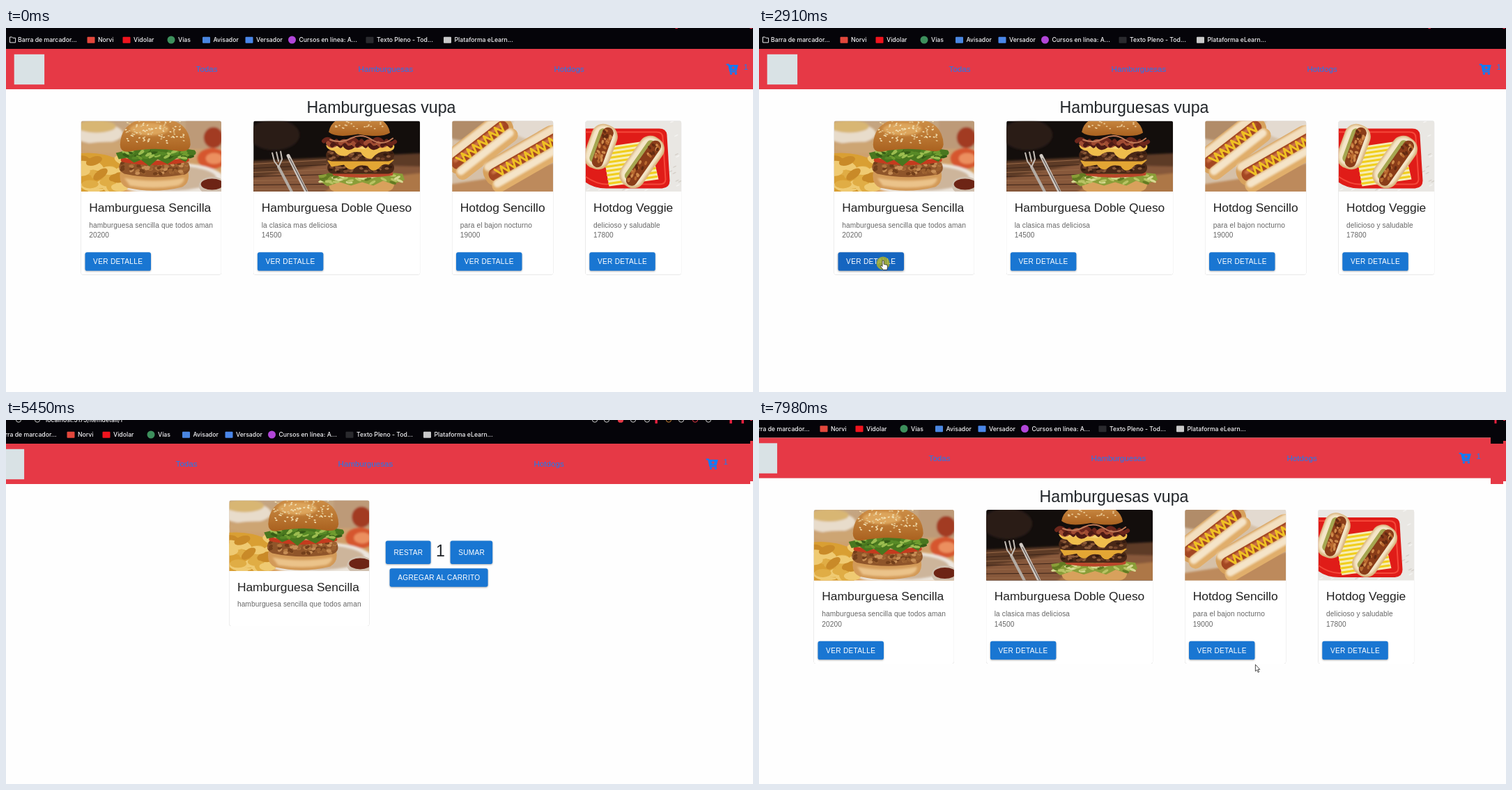
These frames come from a looping animation (1072x523 px, 8 s). An HTML page:

```html
<!DOCTYPE html>
<html lang="es">
<head>
<meta charset="utf-8">
<title>Tienda de hamburguesas</title>
<style>
  html, body { margin: 0; width: 100%; height: 100%; overflow: hidden; background: #fefefe; }
  svg { display: block; width: 100%; height: 100%; }
  text { font-family: "Liberation Sans", Arial, sans-serif; white-space: pre; }
  .tab { font: 500 8.7px Inter, sans-serif; fill: #f4f4f6; }
  .nav { font-size: 11.6px; fill: #1a7cf5; }
  .heading { font-size: 23.2px; fill: #212529; }
  .name { font-size: 17.4px; fill: #212121; }
  .info { font-size: 10.15px; letter-spacing: .01071em; fill: #666; }
  .label { font-size: 10.15px; letter-spacing: .02857em; fill: #fff; }
  .card { fill: #fff; filter: drop-shadow(0 .8px .6px rgba(0,0,0,.34)); }
  .button { fill: #1976d2; filter: drop-shadow(0 1px .8px rgba(0,0,0,.3)); }
  .hover .button { fill: #1565c0; filter: drop-shadow(0 1.8px 1.8px rgba(0,0,0,.4)); }
</style>
</head>
<body>
<svg id="stage" viewBox="0 0 1072 523" preserveAspectRatio="none"></svg>
<script>
const LOOP = 8000;
const BAR = '#050409', RED = '#e63946', BLUE = '#0d7dfb';

// ---- drawing helpers ----
const rect = (x, y, w, h, fill, extra = '') =>
  `<rect x="${x}" y="${y}" width="${w}" height="${h}" fill="${fill}" ${extra}/>`;
const blob = (x, y, rx, ry, fill, turn = 0) =>
  `<ellipse cx="${x}" cy="${y}" rx="${rx}" ry="${ry}" fill="${fill}" transform="rotate(${turn} ${x} ${y})"/>`;
const shape = (d, fill) => `<path d="${d}" fill="${fill}"/>`;
const line = (d, stroke, width) =>
  `<path d="${d}" fill="none" stroke="${stroke}" stroke-width="${width}" stroke-linecap="round" stroke-linejoin="round"/>`;
const text = (cls, x, y, str) => `<text class="${cls}" x="${x}" y="${y}">${str}</text>`;
const group = (x, y, body, attrs = '') => `<g transform="translate(${x} ${y})" ${attrs}>${body}</g>`;
const turned = (x, y, angle, body) => `<g transform="translate(${x} ${y}) rotate(${angle})">${body}</g>`;
const soft = body => `<g filter="url(#soft)">${body}</g>`;
const repeat = (n, make) => Array.from({ length: n }, (_, i) => make(i)).join('');

function seeded(seed) {
  const next = (min, max) => {
    seed = (seed * 16807) % 2147483647;
    return +(min + (max - min) * seed / 2147483647).toFixed(1);
  };
  next.pick = list => list[Math.floor(next(0, list.length - .06))];
  return next;
}

// ---- food pictures, drawn from their own top left corner ----
function burger() {
  const rnd = seeded(71);
  const crumbs = (n, x0, x1, y0, y1, rx, ry, colors) => repeat(n, () =>
    blob(rnd(x0, x1), rnd(y0, y1), rx, ry, rnd.pick(colors), rnd(-40, 40)));
  return rect(0, 0, 201, 102, 'url(#table)')
    + soft(rect(150, -10, 60, 50, '#bd9a78') + blob(24, 18, 36, 15, '#e8dccb') + blob(22, 8, 28, 9, '#d8b673')
      + blob(40, 38, 40, 8, '#cda573') + blob(190, 24, 14, 15, '#a23a24')
      + blob(188, 54, 21, 15, '#d6562f') + blob(191, 54, 12, 8, '#eb8f5f')
      + blob(128, 84, 78, 24, '#ece6de') + blob(128, 82, 66, 18, '#cdb59b'))
    + blob(10, 80, 62, 34, '#d99f33')
    + crumbs(36, -4, 62, 52, 104, 12, 6, ['#e0ad45', '#efca72', '#c98a28'])
    + shape('M57 70H153Q158 88 145 95Q105 105 66 96Q52 90 57 70Z', '#d39a58')
    + soft(shape('M62 82Q104 90 148 82Q148 90 138 93Q104 99 70 93Z', '#ebc38a'))
    + shape('M57 60Q104 54 154 60Q160 72 149 77Q104 85 62 76Q50 70 57 60Z', '#8f552a')
    + crumbs(70, 58, 152, 60, 77, 3.5, 2.2, ['#b37740', '#733f1b', '#9c6130', '#c68d55'])
    + line('M60 56Q104 65 152 56', '#c43b1e', 6)
    + shape('M50 46Q104 32 163 42Q169 49 156 51L150 59L138 53L124 62L110 55L98 65L86 56L76 60L66 53L54 55Z', '#49771f')
    + crumbs(45, 55, 158, 42, 54, 5, 2, ['#6f9c2f', '#365d16', '#9cbd50', '#588a27'])
    + shape('M56 34Q58 -4 105 -4Q156 -4 157 34Q156 46 138 43Q104 37 70 44Q56 46 56 34Z', 'url(#bun)')
    + soft(blob(98, 12, 28, 9, '#dda55c'))
    + crumbs(90, 64, 148, 0, 32, 1.6, .9, ['#f2dfb2', '#e2c087'])
    + blob(188, 93, 19, 13, '#cfbfae') + blob(188, 91, 16, 8, '#6d2415');
}

function doubleBurger() {
  const rnd = seeded(29);
  const patty = (x, y, w, h) => rect(x, y, w, h, '#4a2817', `rx="${h / 2}"`)
    + repeat(45, () => blob(rnd(x + 4, x + w - 4), rnd(y + 3, y + h - 3), 3, 1.8, rnd.pick(['#74442a', '#331a0f', '#8b5a39'])));
  return rect(0, 0, 239, 102, '#130e0c')
    + soft(blob(30, 20, 36, 22, '#2c1e17') + shape('M-9 58L250 46V112H-9Z', '#5d3b27')
      + shape('M-9 84L105 62L250 66V112H-9Z', '#87583a') + shape('M120 88L250 74V112H90Z', '#ad7747'))
    + repeat(9, i => line(`M0 ${62 + i * 6}L104 ${56 + i * 7}`, i % 2 ? '#3b2318' : '#976847', 1))
    + line('M36 66L56 104', '#b3aba3', 4) + line('M27 46L30 58L36 66L41 55L39 44M33 45L36 58', '#c4bdb6', 2)
    + line('M50 50L76 102', '#d0c9c3', 5) + line('M52 54L77 102', '#6d6460', 1.5)
    + shape('M108 86H202Q204 100 190 102H118Q106 100 108 86Z', '#d8a15c')
    + shape('M93 78Q150 68 214 76L217 85L200 91L186 86L172 93L156 88L140 93L124 88L106 94L96 87Z', '#8a9e38')
    + repeat(35, () => blob(rnd(98, 212), rnd(77, 89), 5, 1.8, rnd.pick(['#b9c364', '#637a22', '#d6d890']), rnd(-30, 30)))
    + line('M116 76Q155 82 198 76', '#b9472a', 5)
    + patty(106, 59, 96, 17)
    + shape('M106 57Q150 50 202 56L194 63Q186 60 180 68Q170 76 164 65Q152 61 144 69Q136 72 130 63L112 66Z', '#e3a634')
    + patty(104, 41, 98, 17)
    + shape('M104 35Q150 28 202 35Q204 43 192 44Q180 42 170 54Q160 56 154 45Q142 43 134 50Q122 52 116 43Q106 42 104 35Z', '#efbd4c')
    + soft(line('M114 37Q140 33 160 40', '#f8da82', 3))
    + repeat(16, i => line(`M${101 + i * 6} ${29 + i % 3 * 3}q5 ${i % 2 ? 7 : -6} 12 1`, ['#6b261b', '#a04c33', '#4d1a14'][i % 3], 6))
    + line('M110 27Q125 33 140 25T170 27T200 25', '#c17a58', 2)
    + shape('M108 16Q112 -8 152 -8Q192 -8 196 17Q184 25 150 19Q118 25 108 16Z', 'url(#bun)')
    + repeat(24, () => blob(rnd(116, 186), rnd(0, 13), 1.4, .9, '#e9c894'));
}

function hotdog() {
  const wave = (from, to) => 'M' + Array.from({ length: Math.floor((to - from) / 5) }, (_, i) =>
    `${from + i * 5 + (i % 2 ? 2 : 0)} ${i % 2 ? 6 : -7}`).join('L');
  const dog = (x, y, angle, len) => turned(x, y, angle,
    rect(-len - 6, -23, 2 * len + 12, 42, '#d7a15c', 'rx="19"')
    + soft(rect(-len, -21, 2 * len, 12, '#f3dfbf', 'rx="6"'))
    + rect(-len, -10, 2 * len, 19, '#a34622', 'rx="9"')
    + soft(rect(-len + 6, -7, 2 * len - 12, 5, '#d07848', 'rx="2"'))
    + line(wave(-len + 12, len), '#efc023', 3)
    + rect(-len - 4, 6, 2 * len + 8, 20, '#e0ae6b', 'rx="10"')
    + soft(rect(-len, 7, 2 * len, 11, '#f5e4c8', 'rx="5"')));
  return rect(0, 0, 145, 102, '#d5c0a8')
    + soft(blob(20, 8, 42, 20, '#b18c69') + blob(125, 8, 40, 20, '#e3dad0')
      + shape('M-9 92L70 80L155 58V112H-9Z', '#bd8a5c'))
    + dog(40, 35, -38, 50) + dog(106, 52, -30, 60);
}

function veggieDog() {
  const rnd = seeded(13);
  const dog = (x, y, len, angle) => turned(x, y, angle,
    rect(-19, -len, 38, 2 * len, '#d9b27a', 'rx="17"')
    + soft(rect(-17, -len + 2, 33, 2 * len - 5, '#f4e6c8', 'rx="15"'))
    + rect(-10, -len + 7, 13, 2 * len - 15, '#a5a650', 'rx="6"')
    + rect(-5, -len + 3, 16, 2 * len - 6, '#8a3d19', 'rx="8"')
    + repeat(30, () => blob(rnd(-3, 9), rnd(8 - len, len - 8), 3, 1.8, rnd.pick(['#b8682e', '#632a11', '#cf8a4b']), rnd(0, 90))));
  return rect(0, 0, 138, 102, '#e9e7e3')
    + repeat(60, () => blob(rnd(0, 138), rnd(0, 100), 3, .8, rnd.pick(['#d6d1ca', '#f5f4f2']), -25))
    + shape('M0 11H106Q116 11 117 20L121 86Q121 96 110 97H30Q12 97 0 88Z', '#e01c18')
    + line('M0 16H102Q111 16 111 24L115 84Q115 91 106 91H30Q16 91 0 80', '#f5483a', 2)
    + shape('M24 38L92 28L105 84L34 94Z', '#f7edb4')
    + repeat(9, i => line(`M${26 + i} ${42 + i * 6}L${94 + i} ${32 + i * 6}`, '#f1ce1d', 3))
    + dog(22, 37, 33, 20) + dog(81, 59, 41, 35);
}

// ---- page parts ----
let clipCount = 0;
function picture(width, body) {
  const id = 'photo' + clipCount++;
  return `<clipPath id="${id}"><path d="M0 101.5V3Q0 0 3 0H${width - 3}Q${width} 0 ${width} 3V101.5Z"/></clipPath>`
    + `<g clip-path="url(#${id})">${body}</g>`;
}

function button(x, y, w, h, label, id = '') {
  return group(x, y, `<rect class="button" width="${w}" height="${h}" rx="2.9"/>`
    + text('label', 11.6, h / 2 + 3.6, label), id && `id="${id}"`);
}

function card(x, y, w, h, photo, name, lines, extra = '') {
  return group(x, y, `<rect class="card" width="${w}" height="${h}" rx="2.9"/>`
    + picture(w, photo()) + text('name', 11.6, 130.3, name)
    + lines.map((str, i) => text('info', 11.6, 153 + i * 14.5, str)).join('') + extra);
}

const menu = [
  [107.7, 201.2, burger, 'Hamburguesa Sencilla', 'hamburguesa sencilla que todos aman', '20200'],
  [355.1, 239, doubleBurger, 'Hamburguesa Doble Queso', 'la clasica mas deliciosa', '14500'],
  [640.2, 145, hotdog, 'Hotdog Sencillo', 'para el bajon nocturno', '19000'],
  [831.5, 137.6, veggieDog, 'Hotdog Veggie', 'delicioso y saludable', '17800'],
];

const listPage = text('heading', 431.5, 122, 'Hamburguesas vupa')
  + menu.map(([x, w, photo, name, info, price], i) => card(x, 133.5, w, 221, photo, name, [info, price],
      button(5.8, 188.8, 94.5, 26.5, 'VER DETALLE', 'buy' + i))).join('');

const detailPage = card(349.3, 111.4, 201, 180.5, burger, menu[0][3], [menu[0][4]])
  + button(573.8, 169.4, 64.8, 33.6, 'RESTAR') + text('heading', 646, 191.5, '1')
  + button(666.6, 169.4, 60.6, 33.6, 'SUMAR') + button(579.6, 209.2, 141, 26.5, 'AGREGAR AL CARRITO');

const bookmarks = [
  [132, 'Norvi', '#e2473c'], [183, 'Vidolar', '#f0141e'], [247, 'Vías', '#3d8f5c', 'round'],
  [297.5, 'Avisador', '#4a86e0'], [359, 'Versador', '#4a86e8'],
  [420.5, 'Cursos en línea: A...', '#b146d8', 'round'],
  [532, 'Texto Pleno - Tod...', '#2a2a2e'], [643.5, 'Plataforma eLearn...', '#c9c9c9'],
];

const toolIcons = [47, 74, 874, 891, 929, 949, 980, 998, 1018, 1037];
const toolColors = { 980: '#c98332', 1018: RED };

const chrome = rect(-40, -30, 1200, 60, BAR)
  + text('tab', 86, -.8, 'localhost:5173/itemdetail/1')
  + toolIcons.map(x => `<circle cx="${x}" cy="-4.4" r="3.6" fill="none" stroke="${toolColors[x] || '#ccc'}"/>`).join('')
  + blob(911, -3.6, 4, 3.4, RED)
  + [960.5, 1067.5, 1084.5].map(x => rect(x, -8, 3.4, 9, '#e8213f')).join('')
  + line('M5.5 20.5V13H8.6L9.8 14.3H13.6V20.5Z', '#e8e8ea', 1) + text('tab', 17, 20.2, 'Barra de marcador...')
  + bookmarks.map(([x, label, color, round]) => (round ? blob(x - 10, 17, 5.5, 5.5, color)
      : rect(x - 15.5, 12.7, 11, 9, color, 'rx="1"')) + text('tab', x, 20.2, label)).join('')
  + rect(-40, 30, 1200, 58, RED, 'style="filter:drop-shadow(0 .5px .5px rgba(0,0,0,.15))"')
  + rect(11.7, 37.8, 43.4, 43.4, '#d9e2e5')
  + text('nav', 272.6, 63.4, 'Todas') + text('nav', 505.6, 63.4, 'Hamburguesas') + text('nav', 786.5, 63.4, 'Hotdogs')
  + line('M1034.5 52.5H1037L1039.3 62.8H1048', BLUE, 1.9) + shape('M1037 53H1050.8L1048.7 61.2H1039Z', BLUE)
  + line('M1043.7 55V59.2M1041.6 57.1H1045.8', RED, 1.2) + blob(1040.4, 65.6, 1.7, 1.7, BLUE) + blob(1047.4, 65.6, 1.7, 1.7, BLUE)
  + text('nav', 1058.6, 60, '1');

// Right-edge bands that keep an earlier scroll position.
const band = (x, w, dy, markX) => rect(x, 0, w, 523, '#fefefe') + rect(x, 0, w, 30 + dy, BAR)
  + rect(x, 30 + dy, w, 58, RED) + rect(markX, 0, 3, 1 + dy, '#e8213f');

const gradient = (id, from, to) => `<linearGradient id="${id}" x2="0" y2="1">`
  + `<stop stop-color="${from}"/><stop offset="1" stop-color="${to}"/></linearGradient>`;

document.getElementById('stage').innerHTML =
  `<defs>${gradient('table', '#c3a583', '#d99c57')}${gradient('bun', '#d0924a', '#a9611f')}`
  + '<filter id="soft"><feGaussianBlur stdDeviation="1.6"/></filter></defs>'
  + rect(0, 0, 1072, 523, '#fefefe')
  + `<g id="page">${chrome}<g id="list">${listPage}</g><g id="detail">${detailPage}</g></g>`
  + `<g id="edge">${band(1068, 4, 0, 1068)}</g><g id="innerEdge">${band(1050, 18, 4, 1055.5)}</g>`
  + '<circle id="click" cx="178" cy="338" r="9.5" fill="#a9b02c" opacity=".85"/>'
  + '<g id="cursor" stroke="#222" stroke-width=".8" fill="#fff" stroke-linejoin="round">'
  + '<path id="arrow" d="M.4 .4V10L2.6 8L4.2 11.6L5.7 11L4.1 7.4H6.8Z"/>'
  + '<path id="hand" d="M-1 1a1 1 0 0 1 2.2 0V5.4L5 6.2Q7 6.7 6.6 9L5.8 13.6H.4L-3.6 8.6Q-3.6 7 -2 7.6L-1 8.6Z"/></g>';

// ---- motion: [time, x, y] stops for each visible stretch of pointer travel ----
const pointerRuns = [
  [[390, 956, 459], [650, 847, 355], [920, 847, 355], [1250, 560, 150], [1480, 295, 54], [1710, 392, 354],
   [1780, 392, 354], [1910, 378, 346], [2240, 49, 110], [2580, 178, 334], [2980, 178, 334], [3390, 592, 218],
   [3460, 592, 218], [4050, 37, 28], [4250, 8, 3], [4650, 8, 3]],
  [[6320, 3, 3], [6390, 3, 3], [7120, 690, 332], [7180, 690, 332], [7310, 847, 523]],
  [[7980, 712, 351], [8000, 712, 351]],
];

const within = (t, from, to) => t >= from && t < to;
const ease = p => p * p * (3 - 2 * p);
const progress = (t, from, to) => ease(Math.min(1, Math.max(0, (t - from) / (to - from))));

function pointerAt(t) {
  const run = pointerRuns.find(r => within(t, r[0][0], r[r.length - 1][0]));
  if (!run) return null;
  const i = run.findIndex(stop => stop[0] > t);
  const [t0, x0, y0] = run[i - 1], [t1, x1, y1] = run[i];
  const p = ease((t - t0) / (t1 - t0));
  return [x0 + (x1 - x0) * p, y0 + (y1 - y0) * p];
}

const el = id => document.getElementById(id);
const show = (id, on) => { el(id).style.display = on ? '' : 'none'; };

function render(t) {
  const pan = progress(t, 4650, 5450), rise = progress(t, 5520, 5920);
  el('page').setAttribute('transform', `translate(${-29 * pan} ${4 * pan - 8.5 * rise})`);
  const onDetail = within(t, 2980, 6390);
  show('list', !onDetail);
  show('detail', onDetail);
  show('edge', t >= 4650);
  show('innerEdge', t >= 5520);
  show('click', within(t, 2840, 2980));
  const overFirst = within(t, 2560, 2980), overThird = within(t, 7080, 7200);
  el('buy0').classList.toggle('hover', overFirst);
  el('buy2').classList.toggle('hover', overThird);

  const pointer = pointerAt(t);
  show('cursor', pointer);
  if (pointer) el('cursor').setAttribute('transform', `translate(${pointer})`);
  const hand = within(t, 1850, 1980) || overFirst || overThird;
  show('hand', hand);
  show('arrow', !hand);
}

const start = performance.now();
function tick() {
  render((performance.now() - start) % LOOP);
  requestAnimationFrame(tick);
}
tick();
</script>
</body>
</html>
```
